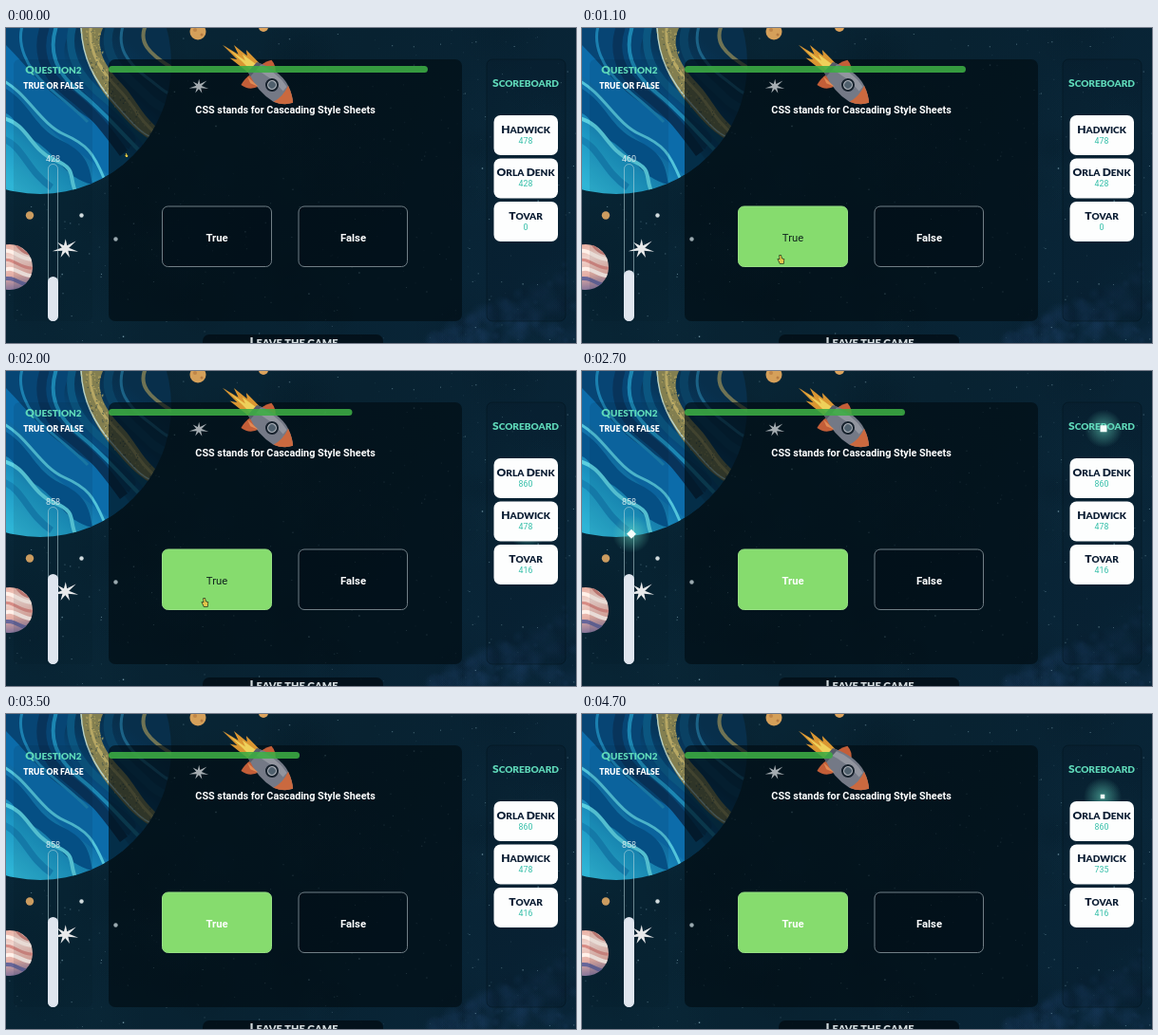
Animation, 600 px wide and 332 px high, one loop 4.8 s. Source, as an HTML page with a canvas:

```html
<!DOCTYPE html>
<html lang="en">
<head>
<meta charset="utf-8">
<title>Quiz</title>
<style>
html, body { margin: 0; width: 100%; height: 100%; overflow: hidden; background: #0a2231; }
canvas { display: block; width: 600px; height: 332px; }
</style>
</head>
<body>
<canvas id="stage"></canvas>
<script>
const W = 600, H = 332, LOOP = 4800, TAU = Math.PI * 2;
const TITLE = 'Lato, sans-serif', BODY = 'Roboto, sans-serif';
const canvas = document.getElementById('stage');
const dpr = Math.max(1, window.devicePixelRatio || 1);

function surface(c) {
  c.width = W * dpr;
  c.height = H * dpr;
  const g = c.getContext('2d');
  g.scale(dpr, dpr);
  return g;
}
const ctx = surface(canvas);

let seed = 11;
function rnd() {
  seed = (seed * 16807) % 2147483647;
  return seed / 2147483647;
}
const clamp = v => Math.max(0, Math.min(1, v));
const span = (t, a, b) => clamp((t - a) / (b - a));
const mix = (a, b, p) => a + (b - a) * p;

// Piecewise linear value through [time, value] pairs
function follow(t, keys) {
  for (let i = 1; i < keys.length; i++) {
    const [t0, a] = keys[i - 1], [t1, b] = keys[i];
    if (t <= t1) return mix(a, b, span(t, t0, t1));
  }
  return keys[keys.length - 1][1];
}

function box(g, x, y, w, h, r, fill, line) {
  g.beginPath();
  g.roundRect(x, y, w, h, r);
  if (fill) { g.fillStyle = fill; g.fill(); }
  if (line) { g.strokeStyle = line; g.lineWidth = 1; g.stroke(); }
}
function disc(g, x, y, r, fill) {
  g.beginPath();
  g.arc(x, y, r, 0, TAU);
  g.fillStyle = fill;
  g.fill();
}
function glow(g, x, y, r, rgb, a) {
  const grad = g.createRadialGradient(x, y, 0, x, y, r);
  grad.addColorStop(0, `rgba(${rgb},${a})`);
  grad.addColorStop(1, `rgba(${rgb},0)`);
  disc(g, x, y, r, grad);
}
function ramp(g, x0, y0, x1, y1, colors) {
  const grad = g.createLinearGradient(x0, y0, x1, y1);
  colors.forEach((c, i) => grad.addColorStop(i / (colors.length - 1), c));
  return grad;
}
function shape(g, path, fill) {
  g.fillStyle = fill;
  g.fill(new Path2D(path));
}
function band(g, path, color, width) {
  g.strokeStyle = color;
  g.lineWidth = width;
  g.stroke(new Path2D(path));
}
function text(g, str, x, y, font, color) {
  g.font = font;
  g.fillStyle = color;
  g.textAlign = 'center';
  g.fillText(str, x, y);
}

// Centred text whose lower-case letters become slightly smaller capitals
function caps(g, str, x, y, size, color) {
  const runs = str.match(/[A-Z]+|[^A-Z]+/g).map(s => {
    const small = s !== s.toUpperCase();
    g.font = `900 ${small ? size * 0.84 : size}px ${TITLE}`;
    return { s: s.toUpperCase(), font: g.font, w: g.measureText(s.toUpperCase()).width };
  });
  let left = x - runs.reduce((sum, r) => sum + r.w, 0) / 2;
  g.textAlign = 'left';
  g.fillStyle = color;
  for (const r of runs) {
    g.font = r.font;
    g.fillText(r.s, left, y);
    left += r.w;
  }
}

function burst(g, x, y, r, fill) {
  g.beginPath();
  for (let i = 0; i < 14; i++) {
    const a = 0.25 + i * TAU / 14;
    const d = i % 2 ? r * 0.32 : r * (1 + 0.17 * Math.cos(i * 2.1));
    g.lineTo(x + d * Math.cos(a), y + d * Math.sin(a) * 0.95);
  }
  g.fillStyle = fill;
  g.fill();
}

function sky(g) {
  g.fillStyle = ramp(g, 0, 0, W, H, ['#082738', '#082231', '#09263a']);
  g.fillRect(0, 0, W, H);
  for (let i = 0; i < 50; i++) {
    glow(g, rnd() * W, rnd() * H, 20 + rnd() * 45, i % 2 ? '3,20,31' : '15,50,68', 0.16);
  }
  for (let i = 0; i < 130; i++) {
    const p = rnd();
    glow(g, 600 - p * 150, 330 - rnd() * 90 * (1 - p), 3 + rnd() * 11, i % 3 ? '24,57,91' : '8,31,50', 0.3);
  }
  for (let i = 0; i < 420; i++) {
    g.fillStyle = `rgba(150,190,204,${0.12 + rnd() ** 2 * 0.65})`;
    const s = rnd() < 0.15 ? 1.4 : 0.9;
    g.fillRect(rnd() * W, rnd() * H, s, s);
  }
}

function bluePlanet(g) {
  g.save();
  g.beginPath();
  g.arc(36, 37, 138, 0, TAU);
  g.clip();
  g.fillStyle = ramp(g, 5, 165, 130, 15, ['#2eb5d6', '#1d98c4', '#1070aa', '#075187', '#07385d', '#082f4b']);
  g.fillRect(0, 0, 180, 180);

  shape(g, 'M0 0 H70 C48 31 70 62 112 93 S130 119 130 128 C87 108 42 78 0 45Z', '#074574');
  shape(g, 'M0 18 C25 43 38 65 73 86 S117 122 132 141 L112 158 C76 128 56 119 42 101 S17 60 0 51Z', '#0c6caa');
  shape(g, 'M0 64 C25 79 31 106 57 118 S88 143 91 165 C61 158 53 132 30 119 S12 95 0 90Z', '#06568f');
  band(g, 'M-4 55 C22 68 36 101 61 112 S92 132 103 158', '#52c4db', 3);
  band(g, 'M-3 95 C23 101 26 129 51 139 S65 157 74 174', '#5bd0e1', 4);
  band(g, 'M-5 116 C18 123 22 151 48 168', '#1684b5', 7);
  band(g, 'M42 -5 C31 24 39 48 66 69 S102 102 124 132', '#08345b', 10);
  band(g, 'M54 -5 C43 25 53 48 78 68 S112 101 139 128', '#1c86b2', 4);
  band(g, 'M18 -5 C10 17 22 42 42 60 S69 82 86 99', '#1b80b0', 3);
  band(g, 'M71 -5 C61 27 77 52 103 73 S134 105 157 132', '#0b5680', 8);

  shape(g, 'M78 0 H102 C92 22 106 42 122 59 S142 92 166 111 L162 123 C138 111 128 99 113 81 S84 44 78 0Z', '#837f50');
  band(g, 'M79 -5 C79 31 94 57 115 80 S141 112 164 120', '#b8d2c7', 1.4);
  band(g, 'M90 -5 C84 23 101 47 118 64 S139 97 163 116', '#b6a764', 3);
  band(g, 'M111 -5 C100 20 114 40 134 58 S151 78 174 88', '#0a4163', 9);
  band(g, 'M124 -5 C115 20 128 37 148 52 S165 67 178 71', '#1b6286', 3);
  band(g, 'M148 -5 C138 14 149 27 178 44', '#6f7354', 4);
  for (let i = 0; i < 170; i++) {
    const p = rnd();
    g.fillStyle = i % 3 ? 'rgba(201,183,105,.65)' : 'rgba(7,43,66,.5)';
    g.fillRect(85 + 75 * p * p + (rnd() - 0.3) * 20, p * 118 + (rnd() - 0.5) * 9, 1.2, 1.2);
  }
  g.restore();
}

function pinkPlanet(g) {
  g.save();
  g.beginPath();
  g.arc(4, 252, 24, 0, TAU);
  g.clip();
  g.fillStyle = ramp(g, 0, 225, 8, 278, ['#e9a798', '#f0d6cf', '#e6afa5', '#756b98']);
  g.fillRect(0, 225, 30, 55);
  band(g, 'M-4 235 C10 233 14 245 30 244', '#fff0e8', 4);
  band(g, 'M-4 245 C7 241 15 255 31 253', '#d88c85', 3);
  band(g, 'M-4 256 C9 248 17 264 31 261', '#fff0e9', 4);
  band(g, 'M-4 265 C9 260 17 274 28 270', '#66669a', 4);
  band(g, 'M11 228 C17 237 23 238 29 239', '#c97f78', 3);
  g.restore();
}

function rocket(g) {
  g.save();
  g.translate(280, 60);
  g.rotate(0.74);
  shape(g, 'M-24 -8 L-45 -9 L-40 -5 L-58 -4 L-48 0 L-67 4 L-45 5 L-52 9 L-24 7Z', '#d99632');
  shape(g, 'M-24 -5 L-45 -3 L-38 0 L-58 3 L-40 3 L-24 4Z', '#eed05a');
  shape(g, 'M-5 -10 Q-9 -18 -18 -19 Q-21 -15 -23 -7Z', '#c35e38');
  shape(g, 'M-9 10 Q-13 21 -24 22 Q-26 15 -24 6Z', '#c35e38');
  shape(g, 'M-27 -7 Q-5 -17 13 -11 Q23 -7 29 -1 Q24 8 13 12 Q-6 16 -27 7Z', '#747986');
  shape(g, 'M-26 -6 Q-5 -14 13 -9 L13 -3 Q-6 -6 -26 0Z', '#92959f');
  shape(g, 'M13 -11 Q23 -7 29 -1 Q24 8 13 12 Q17 1 13 -11Z', '#ca693f');
  shape(g, 'M-28 -7 L-23 -9 L-23 9 L-28 7Z', '#565c69');
  shape(g, 'M-25 11 L-9 11 L-18 14Z', '#e18a55');
  disc(g, 0, 0, 7, '#17222d');
  disc(g, 0, 0, 5, '#abb0b8');
  disc(g, 0, 0, 3.8, '#50606d');
  g.restore();
}

function backdrop(g) {
  sky(g);
  bluePlanet(g);
  disc(g, 202, 4, 8.5, '#d5a05a');
  disc(g, 199, 2, 2, '#bf8547');
  disc(g, 206, 7, 1.5, '#b67b42');
  disc(g, 271, -1, 5, '#dda35c');
  disc(g, 25, 197.5, 4.2, '#dfaa67');
  disc(g, 79.5, 197.5, 2.2, '#e4eef0');
  pinkPlanet(g);
  burst(g, 62.5, 232.5, 12, '#fff');

  box(g, 8, 33, 83, 276, 6, 'rgba(3,18,29,.09)');
  box(g, 506, 33, 83, 276, 6, 'rgba(3,18,29,.16)', 'rgba(2,15,24,.4)');
  box(g, 108, 33, 372, 276, 7, 'rgba(1,11,18,.64)');
  disc(g, 115.5, 222.5, 2.2, '#9aa9af');
  burst(g, 203, 61.5, 9, '#a5acb1');
  rocket(g);
  box(g, 207, 323, 190, 30, 7, 'rgba(3,15,23,.85)');

  caps(g, 'Question2', 50, 48, 11.9, '#5fd9b9');
  text(g, 'TRUE OR FALSE', 50, 64, `900 8.6px ${TITLE}`, '#fff');
  caps(g, 'Scoreboard', 547, 62, 12, '#5fd9b9');
  text(g, 'CSS stands for Cascading Style Sheets', 294, 90, `600 10.8px ${BODY}`, '#fff');
  caps(g, 'Leave the game', 303, 335.5, 13, '#d2dadd');
}

const back = document.createElement('canvas');
backdrop(surface(back));

function spark(x, y, size, turn, shine, alpha = 1) {
  ctx.save();
  ctx.globalAlpha = alpha;
  if (shine) glow(ctx, x, y, 20, '105,220,195', shine);
  ctx.translate(x, y);
  ctx.rotate(turn);
  ctx.fillStyle = '#f4fffa';
  ctx.fillRect(-size / 2, -size / 2, size, size);
  ctx.restore();
}

function card(i, name, score) {
  const y = 92 + i * 45.5;
  box(ctx, 513.5, y, 67.5, 42, 7, '#fdfefe');
  caps(ctx, name, 547, y + 18.5, 12, '#0b1d33');
  text(ctx, score, 547, y + 29.5, `400 8.8px ${BODY}`, '#35bfa9');
}

function scores(t) {
  const swapped = t >= 1400;
  const lead = ['Orla Denk', swapped ? 860 : 428];
  const rival = ['Hadwick', t >= 3700 ? 735 : 478];
  const rows = swapped ? [lead, rival] : [rival, lead];
  rows.push(['Tovar', t >= 1600 ? 416 : 0]);
  rows.forEach(([name, score], i) => card(i, name, score));
}

function meter(t) {
  const p = span(t, 1040, 1870);
  const h = 47 + 48 * (1 - (1 - p) ** 2);
  box(ctx, 44.5, 143.5, 10, 165, 5, null, 'rgba(190,218,225,.55)');
  box(ctx, 44, 309 - h, 11, h, 5.5, '#dfe5ee');
  text(ctx, Math.round(mix(428, 858, p)), 49.5, 140.5, `400 9px ${BODY}`, '#d3e6ea');
}

function answers(t) {
  const on = t >= 640;
  const hover = on && t < 2480;
  const idle = 'rgba(2,13,21,.3)', edge = '#717f86';
  const font = `600 11.3px ${BODY}`;
  box(ctx, 164.5, 188, 115, 63.5, 6, on ? '#86dc6e' : idle, on ? '#96df83' : edge);
  box(ctx, 308, 188, 114.5, 63.5, 6, idle, edge);
  text(ctx, 'True', 222, 224.5, hover ? `400 11.3px ${BODY}` : font, hover ? '#10251d' : '#fff');
  text(ctx, 'False', 365.5, 224.5, font, '#fff');
}

function hand(t) {
  if (t > 2650) return;
  const p = span(t, 150, 750), e = p * p * (3 - 2 * p), out = span(t, 2400, 2650);
  ctx.save();
  ctx.translate(mix(127, 210, e) + out * 6, mix(134, 244, e) + out * 95);
  ctx.scale(mix(0.5, 1, e), mix(0.5, 1, e));
  const path = new Path2D('M-2 -4 L-.6 -4 L0 -1 L2.5 0 L2 4 L-1.5 4 L-3.5 0 L-1.6 0Z');
  ctx.strokeStyle = '#28351b';
  ctx.lineWidth = 1.4;
  ctx.stroke(path);
  ctx.fillStyle = '#e2c64a';
  ctx.fill(path);
  ctx.restore();
}

const timer = [[0, 444], [1100, 404], [2000, 364.5], [2700, 340], [3100, 326], [4000, 288], [4800, 260.5]];

function draw(t) {
  ctx.clearRect(0, 0, W, H);
  ctx.drawImage(back, 0, 0, W, H);
  box(ctx, 108, 40, follow(t, timer) - 108, 7, 3.5, 'rgba(61,174,68,.88)');

  if (t > 1750 && t < 3300) {
    spark(549 - span(t, 2700, 3100), 61 - (t - 2700) * 0.1525, 7, (t - 2700) / 500, 0.55);
  }
  if (t > 3800) {
    spark(548, 181 - (t - 4000) * 0.134, 4.5, (t - 4700) / 500, 0.55);
  }
  scores(t);
  meter(t);
  if (t > 2550 && t < 3300) {
    const fade = span(t, 2700, 3100);
    spark(52, 172 - (t - 2700) * 0.2925, 7, Math.PI / 4 * (1 - fade), 0.55 * (1 - fade), 1 - 0.25 * fade);
  }
  answers(t);
  hand(t);
}

const start = performance.now();
function tick() {
  draw((performance.now() - start) % LOOP);
  requestAnimationFrame(tick);
}
tick();
</script>
</body>
</html>
```
